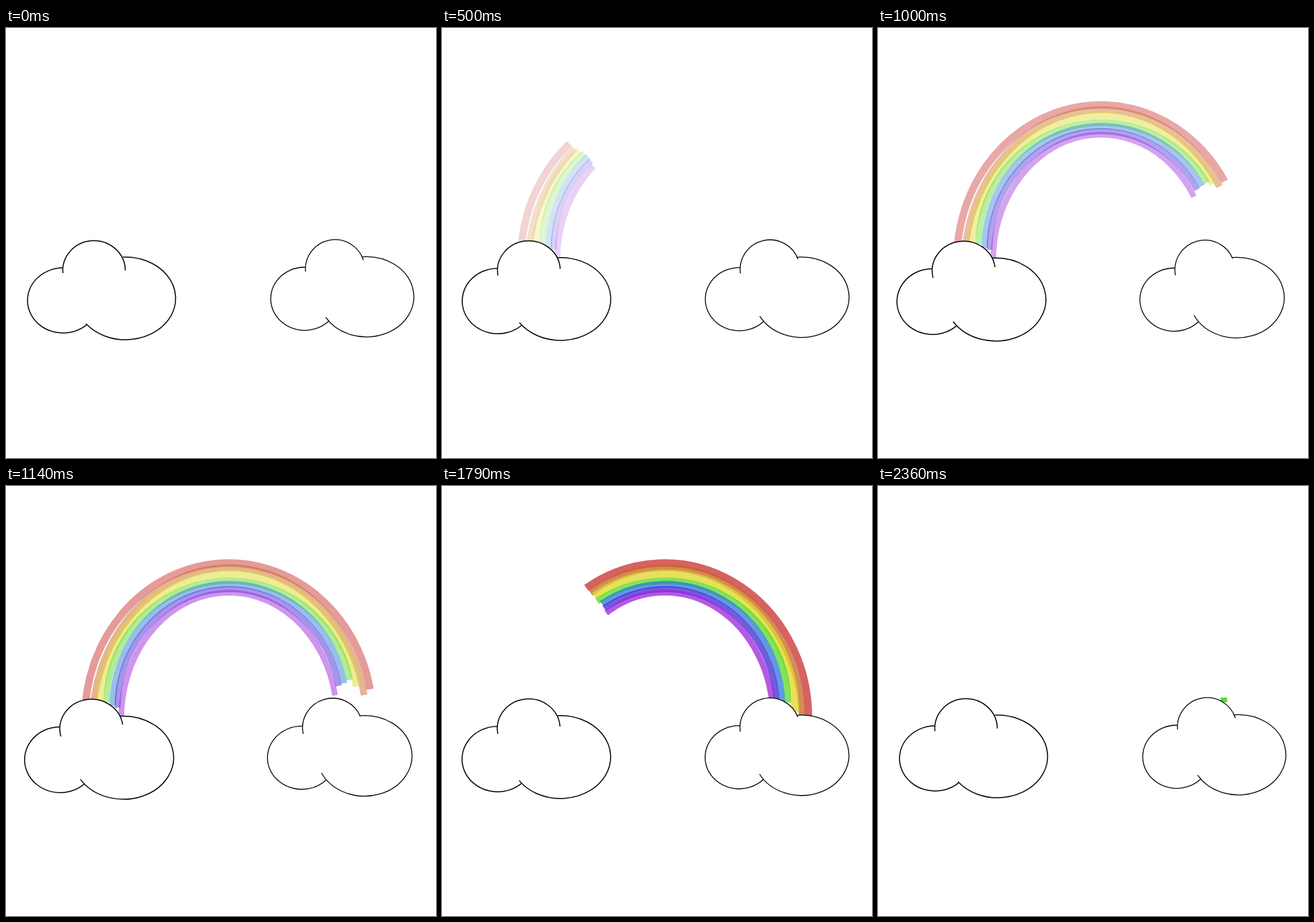
An HTML page for the animation above (2430 ms loop, 640 px wide and 640 px high).

```html
<!DOCTYPE html>
<html lang="en">
<head>
<meta charset="utf-8">
<title>Rainbow between clouds</title>
<style>
  html, body { margin: 0; width: 100%; height: 100%; overflow: hidden; background: #fff; }
  svg { display: block; width: 100vw; height: 100vh; }
</style>
</head>
<body>
<svg id="stage" viewBox="0 0 640 640"></svg>
<script>
const LOOP = 2430, FPS = 14, LAST = 33;
const stage = document.getElementById('stage');

// Half-ellipse bands: top and base heights of the centre line, stroke width,
// and the angle at which the trailing end stops.
const bands = [
  { color: 'rgb(200,50,48)',  cx: 331.5, rx: 214,   top: 114.5, base: 345, w: 11,   stop: 180 },
  { color: 'rgb(200,102,34)', cx: 332.5, rx: 204,   top: 121.5, base: 354, w: 10,   stop: 180 },
  { color: 'rgb(222,216,40)', cx: 332.2, rx: 193.5, top: 130.5, base: 336, w: 12,   stop: 180 },
  { color: 'rgb(88,220,40)',  cx: 332.3, rx: 182.5, top: 141,   base: 322, w: 9.5,  stop: 177.7 },
  { color: 'rgb(44,122,214)', cx: 332.5, rx: 173.5, top: 146,   base: 327, w: 9.5,  stop: 180 },
  { color: 'rgb(70,38,212)',  cx: 332,   rx: 166,   top: 153.5, base: 330, w: 9,    stop: 180 },
  { color: 'rgb(155,38,218)', cx: 332,   rx: 160.5, top: 158.7, base: 346, w: 8.5,  stop: 180 }
];

// Each lobe: [cx, cy, rx, ry, start angle, end angle], at rest and fully drifted.
const clouds = [
  { width: 1.5, lobes: [
    { rest: [85, 405.5, 53, 48.5, 48.7, 269.5],    drift: [80.5, 407.5, 53, 49, 48, 269] },
    { rest: [178, 402.5, 74.5, 61.5, 267, 502.4],  drift: [174.6, 404.4, 74.8, 61.9, 266.5, 508.8] },
    { rest: [131, 361, 46.5, 44.5, 175, 360],      drift: [127, 361.5, 47, 44.1, 165, 351.5] }
  ] },
  { width: 1.3, lobes: [
    { rest: [444.5, 403, 50.5, 47, 44.5, 271],     drift: [440, 404.5, 51, 47, 45, 271] },
    { rest: [536.5, 400, 70.5, 59.7, 265, 509.5],  drift: [533.5, 401.6, 70.7, 60, 264, 515] },
    { rest: [489.8, 358.7, 44.2, 43.7, 175, 342],  drift: [486, 360, 44.7, 44.1, 168, 336.7] }
  ] }
];

function add(tag, attrs) {
  const el = document.createElementNS('http://www.w3.org/2000/svg', tag);
  set(el, attrs);
  return stage.appendChild(el);
}

function set(el, attrs) {
  for (const name in attrs) el.setAttribute(name, attrs[name]);
}

const lerp = (a, b, u) => a + (b - a) * u;

function ease(k, start, end) {
  const u = Math.min(1, Math.max(0, (k - start) / (end - start)));
  return u * u * (3 - 2 * u);
}

function arc(cx, cy, rx, ry, a0, a1) {
  const point = a => {
    const r = a * Math.PI / 180;
    return (cx + rx * Math.cos(r)).toFixed(2) + ' ' + (cy + ry * Math.sin(r)).toFixed(2);
  };
  const large = a1 - a0 > 180 ? 1 : 0;
  return `M${point(a0)}A${rx} ${ry} 0 ${large} 1 ${point(a1)}`;
}

for (const b of bands) {
  b.path = add('path', { fill: 'none', stroke: b.color, 'stroke-width': b.w });
}
for (const c of clouds) {
  for (const l of c.lobes) l.body = add('ellipse', { fill: '#fff' });
  for (const l of c.lobes) l.line = add('path', { fill: 'none', stroke: '#000', 'stroke-width': c.width });
}

function draw(ms) {
  // Motion is stepped at 14 pictures per second.
  const k = Math.min(LAST, Math.floor((ms % LOOP + 5) * FPS / 1000));

  const head = 180 * ease(k, 1, 18.6);
  const shrink = ease(k, 20.2, 33);
  for (const b of bands) {
    const tail = b.stop * shrink;
    set(b.path, {
      d: head - tail > 0.01 ? arc(b.cx, b.base, b.rx, b.base - b.top, 180 + tail, 180 + head) : '',
      'stroke-opacity': k / LAST
    });
  }

  const sway = 1 - Math.abs(k - 16.5) / 16.5;
  for (const c of clouds) {
    for (const l of c.lobes) {
      const now = l.rest.map((v, i) => lerp(v, l.drift[i], sway));
      const [cx, cy, rx, ry] = now;
      set(l.body, { cx, cy, rx, ry });
      set(l.line, { d: arc(...now) });
    }
  }
}

const begin = performance.now();
function tick() {
  draw(performance.now() - begin);
  requestAnimationFrame(tick);
}
tick();
</script>
</body>
</html>
```
